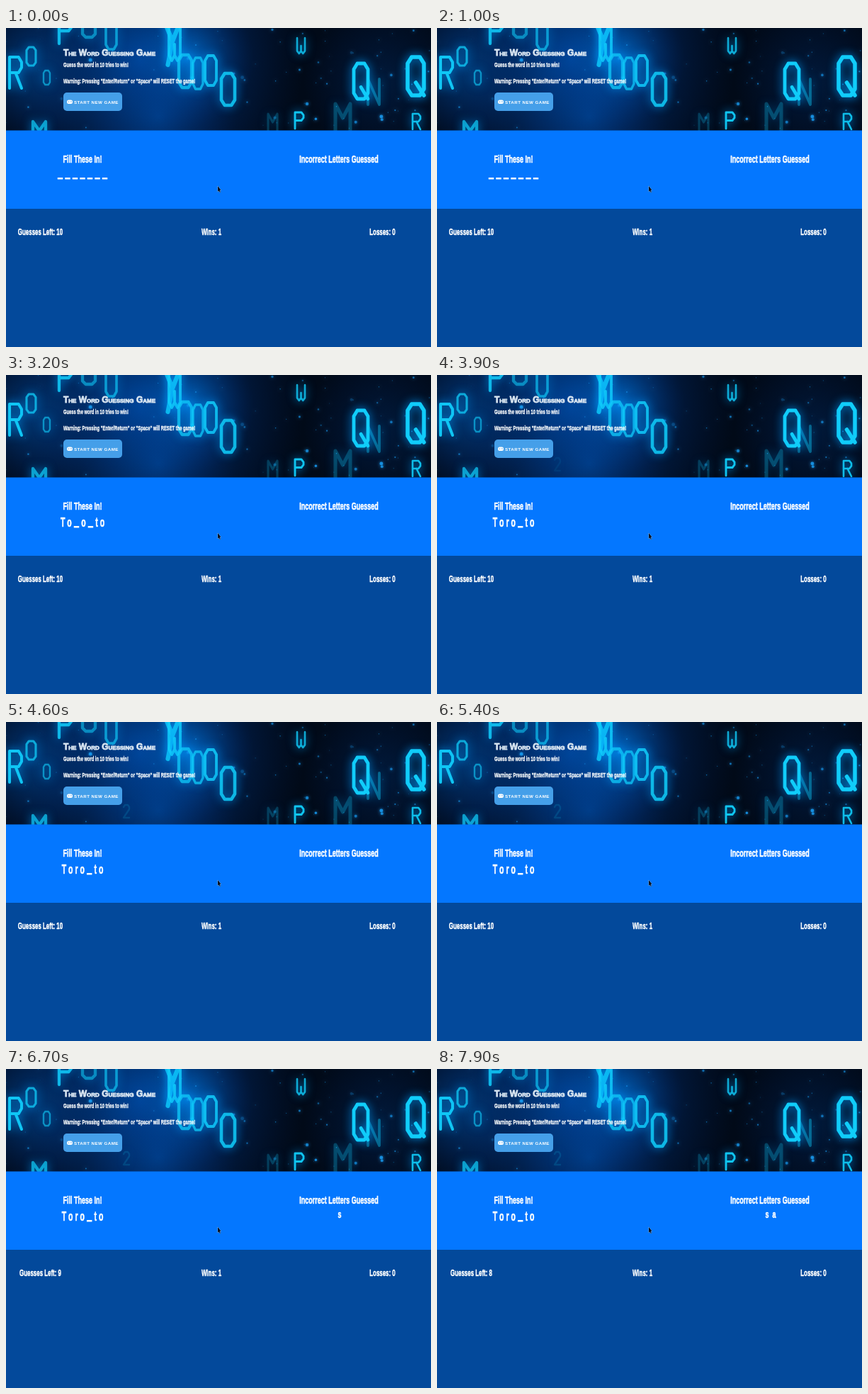
Animation of 600 by 450 pixels, one loop 8 s. Source, as an HTML page with a canvas:

```html
<!DOCTYPE html>
<html lang="en">
<head>
<meta charset="utf-8">
<title>The Word Guessing Game</title>
<style>
html, body { margin: 0; width: 100%; height: 100%; overflow: hidden; background: #03499b; }
canvas { display: block; }
</style>
</head>
<body>
<canvas width="600" height="450"></canvas>
<script>
const ctx = document.querySelector('canvas').getContext('2d');
const LOOP = 8000;
const FACE = '"Liberation Sans", Arial, sans-serif';
const CONDENSED = 0.6;

// Strokes as xy digit pairs on a 4 by 6 grid; "/" lifts the pen
const GLYPHS = {
  O: '10304145361605011030',
  Q: '10304145361605011030/2446',
  R: '0600304142330323/2346',
  P: '06003041423303',
  N: '06004640',
  W: '000516252325364540',
  M: '0600234046',
  U: '000516364540',
  Y: '00234023/2316',
  2: '0110304142330646'
};

// glyph, left, top, width, height, opacity
const RAIN = [
  ['R', 5, 41, 17, 44, .95], ['O', 29, 27, 13, 26, .75], ['O', 53, 60, 9, 20, .6],
  ['P', 75, -14, 18, 36, .85], ['U', 108, -14, 18, 27, .55], ['O', 141, -10, 15, 40, .65],
  ['Y', 222, -14, 26, 66, .85], ['W', 230, 0, 16, 46, .85], ['O', 244, 38, 18, 46, .75],
  ['O', 264, 42, 14, 44, .75], ['O', 281, 39, 16, 42, .85], ['O', 304, 64, 19, 45, .85],
  ['W', 411, 14, 11, 22, .8], ['N', 511, 72, 16, 36, .4], ['Q', 491, 50, 20, 50, 1],
  ['Q', 567, 41, 23, 54, 1], ['P', 408, 119, 12, 23, .95], ['R', 574, 121, 11, 22, .9],
  ['M', 465, 107, 21, 40, .25], ['M', 370, 121, 13, 24, .22], ['M', 38, 132, 18, 26, .7]
];

let seed = 7;
const rand = () => (seed = seed * 16807 % 2147483647) / 2147483647;
const dots = Array.from({ length: 90 }, () =>
  ({ x: rand() * 600, y: rand() * 145, r: .5 + rand() ** 3 * 2, a: .2 + rand() * .7 }));

function rect(x, y, w, h, color) {
  ctx.fillStyle = color;
  ctx.fillRect(x, y, w, h);
}

function glow(x, y, r, color) {
  const g = ctx.createRadialGradient(x, y, 0, x, y, r);
  g.addColorStop(0, color);
  g.addColorStop(1, 'rgba(0,40,110,0)');
  rect(0, 0, 600, 145, g);
}

function glyph(name, x, y, w, h, alpha) {
  ctx.globalAlpha = alpha;
  ctx.lineWidth = Math.max(2.4, w * .24);
  ctx.beginPath();
  for (const stroke of GLYPHS[name].split('/')) {
    stroke.match(/../g).forEach(([px, py], i) =>
      ctx[i ? 'lineTo' : 'moveTo'](x + px * w / 4, y + py * h / 6));
  }
  ctx.stroke();
}

function text(s, x, y, size, align = 'left') {
  ctx.save();
  ctx.translate(x, y);
  ctx.scale(CONDENSED, 1);
  ctx.font = `bold ${size}px ${FACE}`;
  ctx.textAlign = align;
  ctx.fillStyle = ctx.strokeStyle = '#fff';
  ctx.lineWidth = size * .04;
  ctx.fillText(s, 0, 0);
  ctx.strokeText(s, 0, 0);
  ctx.restore();
}

function banner(t) {
  ctx.save();
  ctx.beginPath();
  ctx.rect(0, 0, 600, 145);
  ctx.clip();
  rect(0, 0, 600, 145, '#010a18');
  glow(190, 45, 230, 'rgba(0,85,185,.85)');
  glow(255, 45, 95, 'rgba(0,130,235,.75)');
  glow(215, 125, 110, 'rgba(0,80,175,.5)');
  glow(35, 55, 110, 'rgba(0,75,150,.65)');
  glow(530, 75, 110, 'rgba(0,45,100,.45)');

  ctx.fillStyle = ctx.shadowColor = '#1899ee';
  ctx.shadowBlur = 4;
  for (const d of dots) {
    ctx.globalAlpha = d.a;
    ctx.beginPath();
    ctx.arc(d.x, d.y, d.r, 0, 7);
    ctx.fill();
  }
  ctx.lineJoin = ctx.lineCap = 'round';
  ctx.strokeStyle = '#10cdfa';
  ctx.shadowColor = '#009dff';
  ctx.shadowBlur = 13;
  for (const g of RAIN) glyph(...g);
  glyph('2', 166, 117, 8, 18, .15 * Math.min(1, Math.max(0, (t - 3200) / 1400)));
  ctx.restore();
}

function header() {
  ctx.font = `small-caps 900 12px ${FACE}`;
  ctx.fillStyle = ctx.strokeStyle = '#d9e5f1';
  ctx.lineWidth = .8;
  ctx.fillText('The Word Guessing Game', 81, 38.5);
  ctx.strokeText('The Word Guessing Game', 81, 38.5);
  text('Guess the word in 10 tries to win!', 81, 55, 9.6);
  text('Warning: Pressing "Enter/Return" or "Space" will RESET the game!', 81, 78, 9.7);

  ctx.fillStyle = '#459fe9';
  ctx.beginPath();
  ctx.roundRect(81, 91, 83, 26, 5);
  ctx.fill();
  ctx.fillStyle = '#fff';
  ctx.beginPath();
  ctx.roundRect(86, 101.5, 8, 5.5, 2.5);
  ctx.fill();
  rect(87.5, 103.7, 2, .8, '#459fe9');
  rect(91.3, 103.3, 1.3, 1.3, '#459fe9');
  ctx.font = `bold 6.2px ${FACE}`;
  ctx.letterSpacing = '.45px';
  ctx.fillStyle = '#fff';
  ctx.fillText('START NEW GAME', 96, 106.8);
  ctx.letterSpacing = '0px';
}

// Letters and blanks spread evenly around a centre line
function word(s, cx) {
  const size = 17.5, gap = 3, blank = 7.5;
  ctx.font = `bold ${size}px ${FACE}`;
  const widths = [...s].map(c => c === '_' ? blank : ctx.measureText(c).width * CONDENSED);
  let x = cx - (widths.reduce((a, b) => a + b) + gap * (s.length - 1)) / 2;
  const dashY = /[^_]/.test(s) ? 213 : 211;
  [...s].forEach((c, i) => {
    if (c === '_') rect(x, dashY, blank, 2.5, '#fff');
    else text(c, x, 214, size);
    x += widths[i] + gap;
  });
}

function cursor() {
  ctx.beginPath();
  [[299, 223], [299, 231], [300.6, 229.6], [301.8, 232], [302.8, 231.4], [301.8, 229], [303.4, 228.6]]
    .forEach(p => ctx.lineTo(...p));
  ctx.closePath();
  ctx.strokeStyle = 'rgba(190,215,245,.75)';
  ctx.lineWidth = .8;
  ctx.fillStyle = '#0a1220';
  ctx.stroke();
  ctx.fill();
}

function draw(now) {
  const t = now % LOOP;
  const keys = [['t', 2400], ['o', 2900], ['r', 3900]].filter(k => t >= k[1]).map(k => k[0]);
  const wrong = [['s', 6000], ['a', 7300]].filter(k => t >= k[1]).map(k => k[0]);
  const shown = [...'Toronto'].map(c => keys.includes(c.toLowerCase()) ? c : '_').join('');

  banner(t);
  rect(0, 144.5, 600, 111, '#0477ff');
  rect(0, 255, 600, 195, '#03499b');
  header();
  text('Fill These In!', 108, 190, 15, 'center');
  word(shown, 108);
  text('Incorrect Letters Guessed', 470, 190, 15, 'center');
  text(wrong.join('  '), 471, 210, 15, 'center');
  text('Guesses Left: ' + (10 - wrong.length), 48.5, 292, 13.2, 'center');
  text('Wins: 1', 290, 292, 13.2, 'center');
  text('Losses: 0', 531.5, 292, 13.2, 'center');
  cursor();
  requestAnimationFrame(draw);
}
requestAnimationFrame(draw);
</script>
</body>
</html>
```
